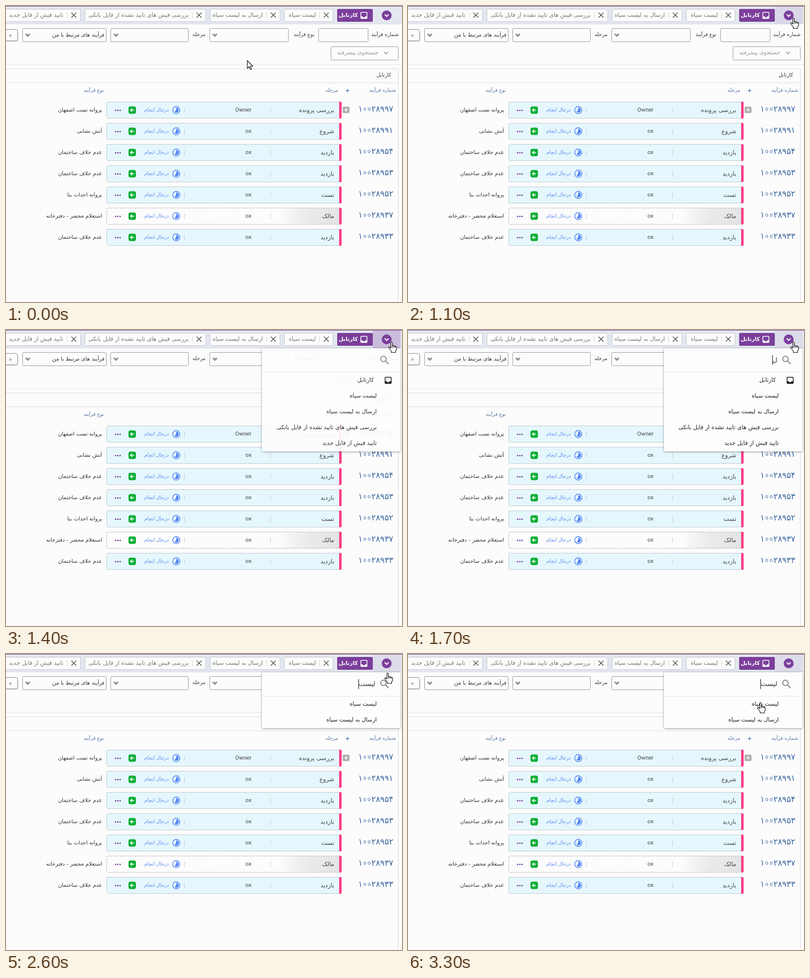
Recreate the animation shown at these times as an HTML page with a canvas. Size 800x600 px, loop 3700 ms.

```html
<!DOCTYPE html>
<html lang="fa">
<head>
<meta charset="utf-8">
<style>
html, body { margin: 0; width: 100%; height: 100%; overflow: hidden; background: #fcfcfc; }
canvas { display: block; }
</style>
</head>
<body>
<canvas id="stage" width="800" height="600"></canvas>
<script>
const ctx = document.getElementById('stage').getContext('2d');
const LOOP = 3700;
const PURPLE = '#7b3f9b';
const PERSIAN = '"DejaVu Sans", sans-serif';
const LATIN = 'Roboto, sans-serif';

const tabs = [
  [562, 661, 'لیست سیاه'],
  [412, 554, 'ارسال به لیست سیاه'],
  [159, 404, 'بررسی فیش های تایید نشده از فایل بانکی'],
  [-20, 151, 'تایید فیش از فایل جدید']
];
const menuItems = ['کارتابل', ...tabs.map(tab => tab[2])];
const rows = [
  ['۱۰۰۲۸۹۹۷', 'بررسی پرونده', 'Owner', 'پروانه تست اصفهان'],
  ['۱۰۰۲۸۹۹۱', 'شروع', 'ox', 'آتش نشانی'],
  ['۱۰۰۲۸۹۵۴', 'بازدید', 'ox', 'عدم خلاف ساختمان'],
  ['۱۰۰۲۸۹۵۳', 'بازدید', 'ox', 'عدم خلاف ساختمان'],
  ['۱۰۰۲۸۹۵۲', 'تست', 'ox', 'پروانه احداث بنا'],
  ['۱۰۰۲۸۹۳۷', 'مالک', 'ox', 'استعلام محضر - دفترخانه'],
  ['۱۰۰۲۸۹۳۳', 'بازدید', 'ox', 'عدم خلاف ساختمان']
];

// Each key is [time, x, y] of the pointer tip; positions hold until the next key.
const pointerKeys = [
  [0, 487, 110], [300, 530, 98], [400, 600, 78], [500, 665, 58], [600, 711, 46],
  [700, 755, 32], [800, 779, 24], [2600, 771, 38], [2700, 745, 65], [2800, 722, 90], [2900, 712, 98]
];
const queryKeys = [[0, ''], [1700, 'ل'], [2000, 'لیس'], [2300, 'لیست']];
const menuAlphaKeys = [[0, 0], [1200, 0.5], [1400, 0.93], [1500, 1]];
const hoverKeys = [[0, 0], [900, 0.04], [1000, 0.07], [1100, 0.09], [1200, 0.16], [1400, 0.25], [1500, 0.18], [1600, 0.12], [1700, 0.07]];
const at = (keys, time) => keys.filter(key => key[0] <= time).pop();

const arrow = new Path2D('M.5 .5V16.5L4.2 13 6.7 18.8 9 17.8 6.5 12H11.5Z');
const hand = new Path2D('M-1.5 1.5Q0-.5 1.5 1.5V7.5Q3.5 6.5 4.5 8.5 6.5 7.5 7.5 9.5 10 9 10 11.5V15L8 19V21.5H-.5V19L-5.5 12.5Q-6.5 10.5-4.5 10L-1.5 12.5Z');
const knuckles = new Path2D('M1.5 7.5V12M4.5 8.5V12M7.5 9.5V12');

function text(string, x, y, size, color, { align = 'right', family = PERSIAN, weight = '' } = {}) {
  ctx.font = `${weight} ${size}px ${family}`;
  ctx.direction = family === LATIN ? 'ltr' : 'rtl';
  ctx.textAlign = align;
  ctx.fillStyle = color;
  ctx.fillText(string, x, y);
}

// Centred Persian number whose zero is an open ring instead of the font's dot.
function number(digits, x, y, size, color) {
  const pitch = size * 0.536;
  [...digits].forEach((digit, i) => {
    const left = x + (i - (digits.length - 1) / 2) * pitch;
    if (digit === '۰') text('o', left, y - size * 0.13, size * 0.62, color, { align: 'center', family: LATIN });
    else text(digit, left, y, size, color, { align: 'center' });
  });
}

function rect(x, y, w, h, color) {
  ctx.fillStyle = color;
  ctx.fillRect(x, y, w, h);
}

function box(x, y, w, h, radius, fill, stroke) {
  const inset = stroke ? 0.5 : 0;
  ctx.beginPath();
  ctx.roundRect(x + inset, y + inset, w - 2 * inset, h - 2 * inset, radius);
  if (fill) { ctx.fillStyle = fill; ctx.fill(); }
  if (stroke) { ctx.strokeStyle = stroke; ctx.lineWidth = 1; ctx.stroke(); }
}

function line(points, color, width = 1) {
  ctx.beginPath();
  points.forEach(([x, y]) => ctx.lineTo(x, y));
  ctx.strokeStyle = color;
  ctx.lineWidth = width;
  ctx.stroke();
}

function disc(x, y, r, color) {
  ctx.beginPath();
  ctx.arc(x, y, r, 0, 7);
  ctx.fillStyle = color;
  ctx.fill();
}

const chevron = (x, y, size, color, width) =>
  line([[x - size, y - size / 2], [x, y + size / 2], [x + size, y - size / 2]], color, width);

function plus(x, y, r, color, width) {
  line([[x - r, y], [x + r, y]], color, width);
  line([[x, y - r], [x, y + r]], color, width);
}

function cross(x, y, r, color, width) {
  line([[x - r, y - r], [x + r, y + r]], color, width);
  line([[x + r, y - r], [x - r, y + r]], color, width);
}

function inbox(x, y, color, inner) {
  box(x, y, 14, 14, 2, color);
  rect(x + 1.5, y + 1.5, 11, 7.5, inner);
  disc(x + 7, y + 9, 2.3, inner);
}

function drawHeader(hover) {
  rect(0, 0, 800, 37, '#e3e8f0');
  rect(0, 36, 800, 1, '#d9dde4');
  ctx.globalAlpha = hover;
  rect(741, 1, 56, 36, PURPLE);
  ctx.globalAlpha = 1;
  rect(0, 0, 800, 1, PURPLE);
  disc(769, 19, 10, PURPLE);
  chevron(769, 19, 4, '#fff', 2);

  box(669, 6, 72, 26, 2, PURPLE);
  text('کارتابل', 711, 22, 11, '#fff', { weight: 'bold' });
  inbox(716, 12, '#fff', PURPLE);
  for (const [left, right, label] of tabs) {
    box(left, 6, right - left, 26, 2, '#fcfcfc', '#c2c5ca');
    cross(right - 14, 18.5, 5, '#444', 1.2);
    rect(right - 28, 13, 1, 11, '#d0d0d0');
    text(label, right - 35, 22, 11.5, '#777');
  }
}

function drawFilters() {
  text('شماره فرآیند', 793, 61, 10.2, '#333');
  box(631, 45, 101, 28, 2, '#fcfcfc', '#999');
  text('نوع فرآیند', 623, 61, 10.2, '#333');
  text('مرحله', 403, 61, 10.2, '#333');
  for (const [left, right] of [[411, 571], [211, 369], [33, 203]]) {
    box(left, 45, right - left, 28, 2, '#fcfcfc', '#999');
    chevron(left + 11, 59, 4, '#888', 2.5);
    line([[left + 6, 57], [left + 16, 57]], '#999');
  }
  text('فرآیند های مرتبط با من', 199, 62, 10.8, '#333');
  box(-10, 49, 35, 24, 4, '#e2e2e2');
  box(-10, 47, 34, 24, 4, '#fcfcfc', '#888');
  number('۰', 9, 64, 13, '#333');
  box(656, 82, 137, 28, 2, '#fcfcfc', '#999');
  chevron(768, 95, 4, '#888', 1.5);
  text('جستجوی پیشرفته', 752, 98, 11.2, '#999');
}

function drawRow([id, stage, user, type], i) {
  const top = 194 + 43 * i;
  const mid = top + 17;
  const draft = i === 5;
  number(id, 747, top + 20, 16.5, '#3a65a0');
  if (draft) {
    const shade = ctx.createLinearGradient(555, 0, 673, 0);
    shade.addColorStop(0, '#e2e4e600');
    shade.addColorStop(0.5, '#e9eaec');
    shade.addColorStop(1, '#e2e4e6');
    rect(555, top + 1, 118, 32, shade);
    ctx.setLineDash([3, 2]);
  }
  box(203, top, 475, 34, 2, draft ? null : '#e5f7fd', draft ? '#a5a5a5' : '#c0c9cc');
  ctx.setLineDash([]);
  box(673, top, 5, 34, [0, 2, 2, 0], '#fa3e84');
  rect(534, top + 12, 1, 11, '#c3ced2');
  rect(360, top + 12, 1, 11, '#c3ced2');
  text(stage, 663, top + 21, 12, '#444');
  text(user, 496, top + 20, 11.5, '#444', { family: LATIN });

  ctx.beginPath();
  ctx.arc(344, mid, 7.2, 0, 7);
  ctx.strokeStyle = '#4f80f2';
  ctx.lineWidth = 1.5;
  ctx.stroke();
  ctx.beginPath();
  ctx.moveTo(344, mid);
  ctx.arc(344, mid, 5, -Math.PI / 2, Math.PI * 0.75);
  ctx.fillStyle = '#4f80f2';
  ctx.fill();
  text('درحال انجام', 329, top + 20, 9.9, '#5587ee');

  box(247.5, mid - 7.5, 15, 15, 4, '#08ad33');
  line([[259, mid], [251.5, mid]], '#fff', 1.6);
  line([[255, mid - 3.5], [251.5, mid], [255, mid + 3.5]], '#fff', 1.6);
  for (const x of [221.5, 226, 230.5]) disc(x, mid + 0.5, 1.5, PURPLE);
  text(type, 194, top + 20, 10.7, '#333');
}

function drawTable() {
  rect(0, 118, 800, 1, '#e3e3e3');
  rect(0, 127, 793, 1, '#d9d9d9');
  rect(792, 127, 1, 473, '#d9d9d9');
  rect(0, 155, 792, 1, '#dedede');
  text('کارتابل', 778, 143, 10.2, '#333');
  for (const [label, right] of [['شماره فرآیند', 788], ['مرحله', 671], ['نوع فرآیند', 198]]) {
    text(label, right, 174, 10, '#5576a8');
  }
  plus(690, 171.5, 3.5, '#3566bd', 1.2);
  rows.forEach(drawRow);
  box(680, 204, 14, 13, 2, '#b0b0b0');
  plus(687, 210.5, 3.5, '#fff', 1.5);
}

function drawMenu(alpha, query, caret) {
  const items = menuItems.filter(item => item.includes(query));
  const panel = [517, 37, 280, 49 + 32 * items.length];
  ctx.save();
  ctx.globalAlpha = alpha;

  // The shadow stays outside the panel so that it does not tint a translucent menu.
  ctx.save();
  const outside = new Path2D();
  outside.rect(0, 0, 800, 600);
  outside.rect(...panel);
  ctx.clip(outside, 'evenodd');
  ctx.shadowColor = '#0006';
  ctx.shadowBlur = 4;
  ctx.shadowOffsetY = 1;
  box(...panel, [0, 0, 3, 3], '#fdfdfd');
  ctx.restore();

  box(...panel, [0, 0, 3, 3], '#fdfdfd');
  rect(517, 85, 280, 1, '#e3e3e3');
  ctx.beginPath();
  ctx.arc(762.5, 58.5, 5.5, 0, 7);
  ctx.strokeStyle = '#888';
  ctx.lineWidth = 2;
  ctx.stroke();
  line([[766.5, 62.5], [773, 69]], '#888', 2.2);

  text(query, 746, 65, 13.4, '#333');
  if (caret) rect(Math.floor(746 - ctx.measureText(query).width), 51, 1, 20, '#000');
  items.forEach((item, i) => {
    const first = item === menuItems[0];
    const y = 102 + 32 * i;
    if (first) inbox(765, y - 7, '#111', '#fdfdfd');
    text(item, first ? 743 : 749, y + 3, 11.5, '#222');
  });
  ctx.restore();
}

function drawPointer([, x, y], isHand) {
  ctx.save();
  ctx.translate(x, y);
  ctx.lineJoin = 'round';
  ctx.lineWidth = 1.1;
  ctx.fillStyle = '#fff';
  ctx.strokeStyle = '#000';
  const shape = isHand ? hand : arrow;
  ctx.fill(shape);
  ctx.stroke(shape);
  if (isHand) ctx.stroke(knuckles);
  ctx.restore();
}

function draw(now) {
  const time = Math.floor((now % LOOP) / 100) * 100;
  rect(0, 0, 800, 600, '#fcfcfc');
  drawHeader(at(hoverKeys, time)[1]);
  drawFilters();
  drawTable();
  const alpha = at(menuAlphaKeys, time)[1];
  const caret = time >= 1700 && (time < 2800 || time >= 3300);
  if (alpha) drawMenu(alpha, at(queryKeys, time)[1], caret);
  drawPointer(at(pointerKeys, time), time >= 800);
}

let start;
function tick(now) {
  start ??= now;
  draw(now - start);
  requestAnimationFrame(tick);
}
requestAnimationFrame(tick);
</script>
</body>
</html>
```
